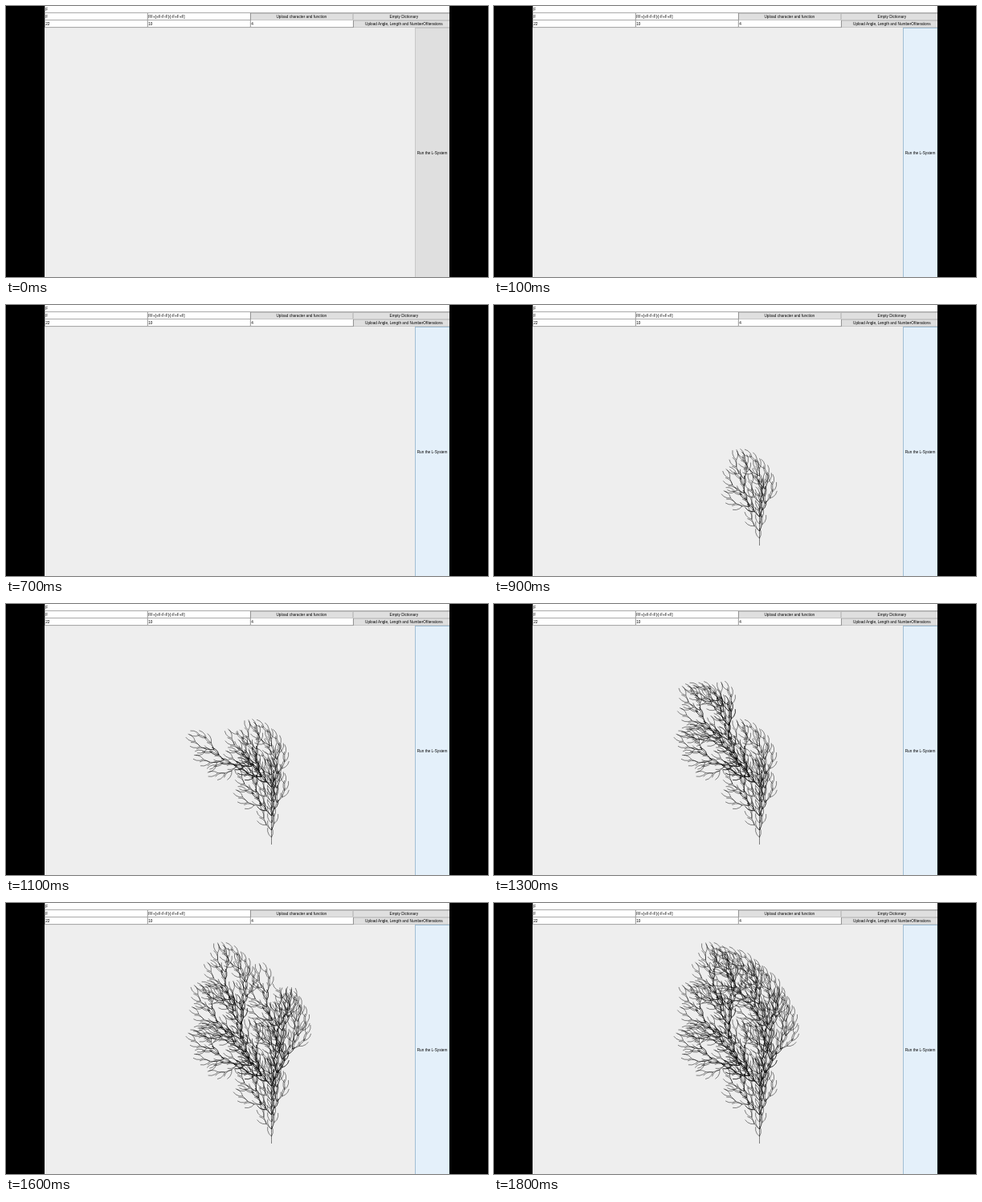
These frames come from a looping animation (600x338 px, 2000 ms). An HTML page:

```html
<!DOCTYPE html>
<html lang="en">
<head>
<meta charset="utf-8">
<title>L-System</title>
<style>
  html, body { margin: 0; height: 100%; overflow: hidden; background: #000; }
  svg { display: block; width: 100vw; height: 100vh; }
  text { font: 4.72px "Liberation Sans", Arial, sans-serif; fill: #000; }
  .field { fill: #fff; }
  .edge { fill: none; stroke: #777; stroke-width: .7; }
  .button { fill: #dfdfdf; stroke: #c0c0c0; stroke-width: .8; }
  .hover { fill: #e4f0fa; stroke: #8fb2cc; }
  .label { text-anchor: middle; }
  #tree { fill: none; stroke: #000; stroke-width: .48; }
</style>
</head>
<body>
<svg viewBox="0 0 600 338">
  <rect x="48" width="504" height="338" fill="#eee"/>
  <g id="form"></g>
  <path id="tree"/>
  <path d="M0 0H48V338H0ZM552 0H600V338H552Z"/>
</svg>
<script>
const LOOP = 2000, STEP = 100;
const HOVER_AT = 100, GROW_AT = 762, SEGMENTS_PER_MS = 4.16;
const RULE = 'FF+[+F-F-F]-[-F+F+F]';
const ANGLE = 22 * Math.PI / 180, LENGTH = 4.48;

const form = document.getElementById('form');
const tree = document.getElementById('tree');

function add(name, attributes, content = '') {
  const node = document.createElementNS('http://www.w3.org/2000/svg', name);
  for (const key in attributes) node.setAttribute(key, attributes[key]);
  node.textContent = content;
  form.append(node);
  return node;
}

function field(x, y, width, value) {
  add('rect', { class: 'field', x, y, width, height: 9 });
  add('path', { class: 'edge', d: `M${x + .4} ${y}v8.6h${width}v-8.6` });
  add('text', { x: x + 1.2, y: y + 6.2 }, value);
}

function button(x, y, width, height, label) {
  const box = add('rect', { class: 'button', x: x + .4, y: y + .4, width: width - .8, height: height - .8 });
  add('text', { class: 'label', x: x + width / 2 - .2, y: y + height / 2 + 1.8 }, label);
  return box;
}

button(304, 9, 128, 9, 'Upload character and function');
button(432, 9, 127, 9, 'Empty Dictionary');
button(432, 18, 127, 9, 'Upload Angle, Length and NumberOfIterations');
const run = button(509, 27, 43.5, 313, 'Run the L-System');
field(48, 0, 505, 'F');
field(48, 9, 128, 'F');
field(176, 9, 128, RULE);
field(48, 18, 128, '22');
field(176, 18, 128, '10');
field(304, 18, 128, '4');

// Expand the axiom, then walk it as a turtle: one path piece per F.
let word = 'F';
for (let i = 0; i < 4; i++) word = word.replace(/F/g, RULE);

const segments = [], stack = [];
let x = 330.5, y = 300, heading = 0;
for (const symbol of word) {
  if (symbol === 'F') {
    const start = `M${x.toFixed(2)} ${y.toFixed(2)}`;
    x -= LENGTH * Math.sin(heading);
    y -= LENGTH * Math.cos(heading);
    segments.push(`${start}L${x.toFixed(2)} ${y.toFixed(2)}`);
  } else if (symbol === '+') heading += ANGLE;
  else if (symbol === '-') heading -= ANGLE;
  else if (symbol === '[') stack.push([x, y, heading]);
  else [x, y, heading] = stack.pop();
}

let shown = -1;
function draw() {
  const time = Math.floor(performance.now() % LOOP / STEP) * STEP;
  if (time !== shown) {
    shown = time;
    run.classList.toggle('hover', time >= HOVER_AT);
    const count = Math.max(0, Math.round((time - GROW_AT) * SEGMENTS_PER_MS));
    tree.setAttribute('d', segments.slice(0, count).join(''));
  }
  requestAnimationFrame(draw);
}
draw();
</script>
</body>
</html>
```
